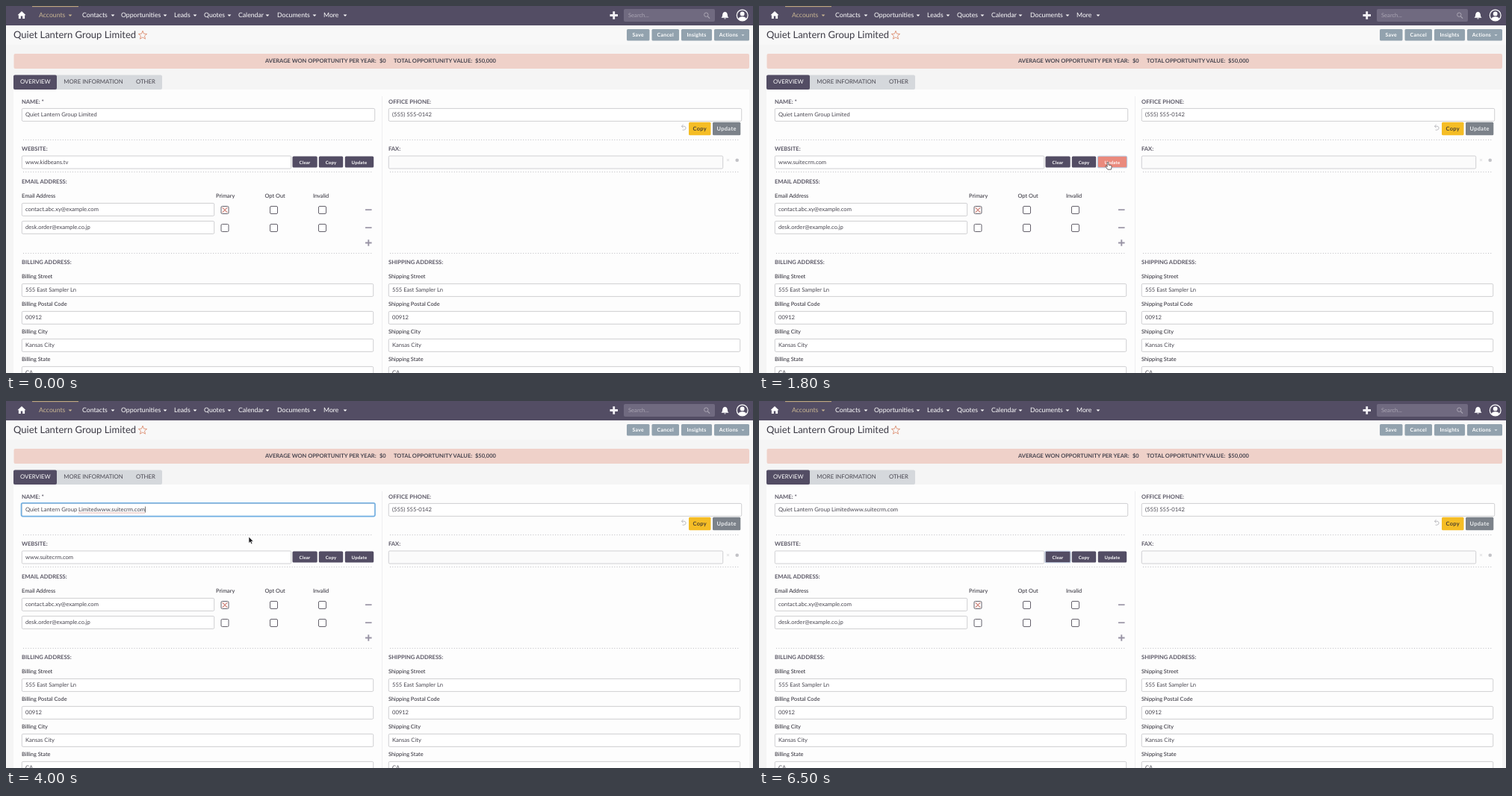
An HTML page for the animation above (6600 ms loop, 1000 px wide and 492 px high).

```html
<!DOCTYPE html>
<html lang="en">
<head>
<meta charset="utf-8">
<title>Account form</title>
<style>
  html, body { margin: 0; width: 100%; height: 100%; overflow: hidden; background: #f5f5f5; }
  svg { display: block; width: 100vw; height: 100vh; }
  text { font-family: Lato, sans-serif; font-size: 7.6px; fill: #484650; text-rendering: geometricPrecision; white-space: pre; }
  .nav { font-size: 8.7px; fill: #fff; }
  .bold { font-size: 7.5px; font-weight: 700; }
  .label { font-weight: 700; fill: #5b5866; }
  .caption { font-size: 7.4px; font-weight: 500; fill: #3a3842; }
  .tab { font-size: 7.8px; }
  .button { font-weight: 700; text-anchor: middle; fill: #fff; }
</style>
</head>
<body>
<svg id="stage" viewBox="0 0 1000 492" preserveAspectRatio="none"></svg>
<script>
const LOOP = 6600;
const STEP = 100;
const COMPANY = 'Quiet Lantern Group Limited';
const OLD_SITE = 'www.kidbeans.tv';
const NEW_SITE = 'www.suitecrm.com';
const DARK = '#534d64';
const HOVER = '#ea8a7d';

const stage = document.getElementById('stage');
const parts = [];
const add = markup => parts.push(markup);

// Shapes; vertical text positions are given as the middle of the capitals.
const box = (x, y, w, h, fill, extra = '') =>
  add(`<rect x="${x}" y="${y}" width="${w}" height="${h}" fill="${fill}" ${extra}/>`);
const text = (x, mid, value, cls = '', extra = '') =>
  add(`<text x="${x}" y="${mid + 2.7}" class="${cls}" ${extra}>${value}</text>`);
const path = (d, stroke, width, fill = 'none', extra = '') =>
  add(`<path d="${d}" stroke="${stroke}" stroke-width="${width}" fill="${fill}" ${extra}/>`);
const field = (x, y, w, value = '', id = '', fill = '#fff') => {
  box(x + .3, y + .4, w - .6, 17, fill, 'stroke="#bcbcc0" stroke-width=".7" rx="1.5"');
  text(x + 5, y + 8.5, value, '', id && `id="${id}"`);
};
const button = (x, y, w, h, fill, label, size, spacing = .3, color = '#fff', id = '') => {
  box(x, y, w, h, fill, `rx="1.5" ${id && `id="${id}"`}`);
  text(x + w / 2, y + h / 2, label, 'button',
    `style="font-size:${size}px;letter-spacing:${spacing}px;fill:${color}"`);
};
const dots = (x, y, w) =>
  path(`M${x} ${y}h${w}`, '#bdbdc2', 1, 'none', 'stroke-dasharray="1 2.3"');

function drawNav() {
  box(0, 0, 1000, 26, DARK);
  box(35, 0, 62, 1.2, '#b9a27d');
  path('M15.5 12.3L21 7l5.5 5.3h-1.4V17h-2.9v-3.4h-2.4V17h-2.9v-4.7z', 'none', 0, '#fff');
  const menu = [['Accounts', 44, 86], ['Contacts', 102, 143], ['Opportunities', 154, 213],
    ['Leads', 225, 253], ['Quotes', 265, 299], ['Calendar', 311, 350],
    ['Documents', 363, 413], ['More', 425, 454]];
  menu.forEach(([name, x, caret], i) => {
    const color = i ? '#fff' : '#c8b592';
    text(x, 12, name, 'nav', `style="fill:${color}"`);
    path(`M${caret - 2.4} 11.5h4.8l-2.4 2.6z`, 'none', 0, color);
  });
  path('M808.5 12.5h10.5M813.75 7.2v10.6', '#f4f2f6', 2.8);
  box(827, 4, 122, 17, '#706a80', 'rx="2"');
  text(833, 12, 'Search...', '', 'style="fill:#aaa5b3"');
  add('<circle cx="937.3" cy="11.7" r="2.7" fill="none" stroke="#aaa5b3"/>');
  path('M939.3 13.8l2.8 2.8', '#aaa5b3', 1.2);
  path('M957.5 15.7q1.8-1.5 1.8-5q.3-2.6 3.2-3q2.9.4 3.2 3q0 3.5 1.8 5zM961 16.6h3q-1.5 2-3 0z', 'none', 0, '#fff');
  add('<circle cx="985.7" cy="12.5" r="7.4" fill="none" stroke="#fff" stroke-width="1.2"/>' +
      '<circle cx="985.7" cy="10.4" r="2.9" fill="#fff"/>');
  path('M980.3 17.2q1-3 5.4-3t5.4 3q-2 2.6-5.4 2.6t-5.4-2.6z', 'none', 0, '#fff');
}

function drawHeader() {
  box(0, 26, 1000, 26, '#f8f8f8');
  text(10, 40.2, COMPANY, '', 'style="font-size:13px;fill:#3c3a45"');
  const star = Array.from({ length: 10 }, (_, i) => {
    const r = i % 2 ? 2.6 : 6, a = i * Math.PI / 5;
    return [183 + r * Math.sin(a), 39.3 - r * Math.cos(a)].map(n => n.toFixed(2));
  });
  path(`M${star.join('L')}z`, '#e09a80', 1);
  [['Save', 831, 30.5], ['Cancel', 864.5, 36.5], ['Insights', 904, 41]].forEach(([name, x, w]) =>
    button(x, 31, w, 15.5, '#92a2ae', name, 6.9));
  button(948, 31, 47, 15.5, '#92a2ae', '', 6.9);
  text(967.5, 38.75, 'Actions', 'button', 'style="font-size:6.9px;letter-spacing:.3px"');
  path('M984.5 38.3h4l-2 2z', 'none', 0, '#dfe5e9');

  box(10.5, 64, 984.5, 20, '#efd1c9', 'rx="2"');
  [[347, 'AVERAGE WON OPPORTUNITY PER YEAR:'], [500, '$0'],
   [519, 'TOTAL OPPORTUNITY VALUE:'], [628, '$50,000']].forEach(([x, s]) => text(x, 73, s, 'bold'));

  box(10, 92.6, 199, 19.4, '#d5d8dc', 'rx="2"');
  box(10, 92.6, 58, 19.4, DARK, 'rx="2"');
  text(19, 101.5, 'OVERVIEW', 'tab', 'style="fill:#fff"');
  text(77.3, 101.5, 'MORE INFORMATION', 'tab');
  text(174, 101.5, 'OTHER', 'tab');
}

function drawAddress(x, kind) {
  text(x, 343.5, `${kind.toUpperCase()} ADDRESS:`, 'label');
  [['Street', '555 East Sampler Ln'], ['Postal Code', '00912'],
   ['City', 'Kansas City'], ['State', 'CA']].forEach(([name, value], i) => {
    text(x, 362.3 + i * 36.9, `${kind} ${name}`, 'caption');
    field(x, 372 + i * 37, 471, value);
  });
}

function drawForm() {
  box(10, 112, 985, 380, '#fdfdfd');
  path('M503.5 121V492', '#efeff0', 1);
  text(21, 128.3, 'NAME: *', 'label');
  text(512, 128.3, 'OFFICE PHONE:', 'label');
  field(21, 137, 473, COMPANY, 'name');
  field(512, 137, 473, '(555) 555-0142');
  path('M904.6 161.2h3.5q2 .5 2 2.5t-2.5 2.5h-2M906.6 159l-2.2 2.2l2.2 2.2', '#b3b3b8', .9);
  button(914, 155.8, 29.5, 17.4, '#f5bd25', 'Copy', 7.4, .4, '#4b4030');
  button(946, 155.8, 37.3, 17.4, '#7c828a', 'Update', 7.4, .4, '#eceef0');

  text(21, 191.5, 'WEBSITE:', 'label');
  text(512, 191.5, 'FAX:', 'label');
  field(21, 200.6, 361, OLD_SITE, 'site');
  button(383.5, 201.6, 33.2, 14.8, DARK, 'Clear', 6, .2, '#fff', 'clear');
  button(418.8, 201.6, 32.4, 14.8, DARK, 'Copy', 6, .2, '#fff', 'copy');
  button(453.8, 201.6, 38.4, 14.8, DARK, 'Update', 6, .2, '#fff', 'update');
  field(512, 200.6, 448, '', '', '#fbfbfb');
  path('M965 205l3 3m0-3l-3 3', '#d2d2d5', .8);
  add('<circle cx="978.7" cy="206.8" r="2.3" fill="#c2c2c6"/>');
  for (const y of [179.5, 222.5, 331.5]) {
    dots(23, y, 467);
    dots(514, y, 468);
  }

  text(21, 235.5, 'EMAIL ADDRESS:', 'label');
  [['Email Address', 21], ['Primary', 281], ['Opt Out', 346.5], ['Invalid', 411]].forEach(([name, x]) =>
    text(x, 253.8, name, 'caption'));
  ['contact.abc.xy@example.com', 'desk.order@example.co.jp'].forEach((mail, row) => {
    const y = 273.5 + row * 24;
    field(21, y - 9.5, 258, mail);
    for (const x of [293, 358.5, 423.5])
      box(x - 5, y - 5, 10, 10, '#fff', 'rx="1.5" stroke="#65626c"');
    path(`M481 ${y - .3}h8.6`, '#9994a5', 1.7);
  });
  path('M289.7 270.2l6.6 6.6m0-6.6l-6.6 6.6', '#cf8278', 1.2);
  path('M481 317.5h8.6M485.3 313.2v8.6', '#9994a5', 1.9);
  drawAddress(21, 'Billing');
  drawAddress(512, 'Shipping');
}

function drawOverlays() {
  box(20.5, 136.8, 473.5, 17.8, 'none', 'id="nameRing" rx="2" stroke="#70afe3" stroke-width="1.6"');
  box(0, 201.2, 0, 15.6, 'none', 'id="buttonRing" rx="2" stroke="#b6c3d9" stroke-width="1.1"');
  path('', '#c9736c', .9, 'none', 'id="spelling" stroke-dasharray="1.2 .9"');
  path('', '#333', .7, 'none', 'id="caret"');
  add('<g id="arrow">');
  path('M0 0v8.6l2-1.8l1.4 3l1.5-.7l-1.4-2.9h2.7z', '#fff', .6, '#1c1c1f');
  add('</g><g id="hand">');
  path('M-.9 .8q.9-1.6 1.8 0v3.3l3 .6q1.3 .4 1.2 1.8l-.7 3.7h-4.6l-3-4q.2-1.3 1.4-.5l.9 .9z', '#4b4347', .8, '#fff');
  add('</g><g id="beam">');
  path('M-2.2-4.2q2 0 2.2 1q.2-1 2.2-1M0-3.4v7M-2.2 4.2q2 0 2.2-1q.2 1 2.2 1', '#55535c', .9);
  add('</g>');
}

drawNav();
drawHeader();
drawForm();
drawOverlays();
stage.innerHTML = parts.join('');

const el = Object.fromEntries([...stage.querySelectorAll('[id]')].map(node => [node.id, node]));
const buttons = { clear: [383.5, 33], copy: [419, 32], update: [454, 38] };

// Pointer stops: time, x, y.
const route = [
  [0, 545, 505], [700, 467, 209], [2200, 467, 209], [2600, 435, 209.5], [2900, 435, 209.5],
  [3200, 271.5, 151], [3700, 271.5, 151], [4000, 325, 182], [4400, 398.5, 212],
  [5800, 398.5, 212], [6300, 500, 505], [LOOP, 500, 505]
];

function pointerAt(t) {
  const i = Math.max(1, route.findIndex(stop => stop[0] > t));
  const [t0, x0, y0] = route[i - 1], [t1, x1, y1] = route[i];
  const u = (t - t0) / (t1 - t0), k = u * u * (3 - 2 * u);
  return [x0 + (x1 - x0) * k, y0 + (y1 - y0) * k];
}

const within = (t, from, to) => t >= from && t < to;
const show = (node, on) => node.setAttribute('visibility', on ? 'visible' : 'hidden');
const setText = (node, value) => { if (node.textContent !== value) node.textContent = value; };

function render(t) {
  const [x, y] = pointerAt(t);
  const inRow = within(y, 201, 217);
  let hovered = null;
  for (const [id, [left, width]] of Object.entries(buttons)) {
    const over = inRow && within(x, left, left + width);
    if (over) hovered = id;
    el[id].setAttribute('fill', over ? HOVER : DARK);
  }
  const overField = (within(y, 137, 154) && within(x, 21, 494)) || (inRow && within(x, 21, 382));
  const kind = hovered ? 'hand' : overField ? 'beam' : 'arrow';
  for (const id of ['arrow', 'hand', 'beam']) {
    show(el[id], id === kind);
    el[id].setAttribute('transform', `translate(${x} ${y})`);
  }

  setText(el.site, t < 1700 ? OLD_SITE : t < 5400 ? NEW_SITE : '');
  const pasted = t >= 3600;
  setText(el.name, pasted ? COMPANY + NEW_SITE : COMPANY);

  const focused = within(t, 900, 2700) ? 'update' : within(t, 2700, 3300) ? 'copy' : t >= 4700 ? 'clear' : null;
  show(el.buttonRing, focused);
  if (focused) {
    const [left, width] = buttons[focused];
    el.buttonRing.setAttribute('x', left - .6);
    el.buttonRing.setAttribute('width', width + 1.2);
  }
  show(el.nameRing, within(t, 3300, 4700));
  show(el.caret, within(t, 3200, 4700));
  show(el.spelling, pasted && t < 4700);
  const end = 26 + el.name.getComputedTextLength();
  const wordStart = 26 + el.name.getSubStringLength(0, COMPANY.lastIndexOf(' ') + 1);
  el.caret.setAttribute('d', `M${end + .5} 141.5v8`);
  el.spelling.setAttribute('d', `M${wordStart} 150H${end}`);
}

const start = performance.now();
function tick() {
  const t = (performance.now() - start) % LOOP;
  render(Math.floor(t / STEP) * STEP);
  requestAnimationFrame(tick);
}
tick();
</script>
</body>
</html>
```
